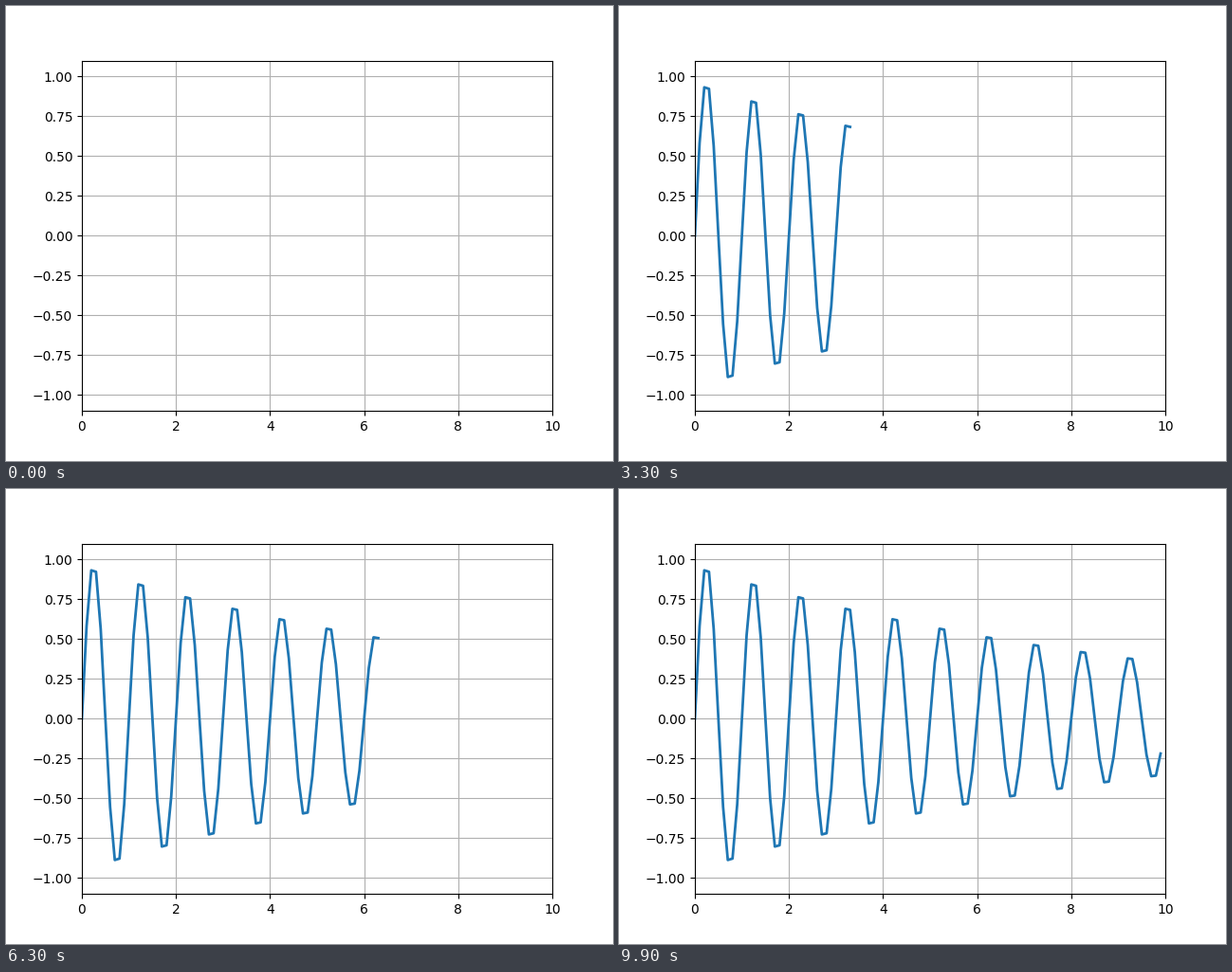
Animation, 640 px wide and 480 px high, one loop 10 s. Source, as a matplotlib script:

```python
import matplotlib.pyplot as plt
import numpy as np
from matplotlib.animation import FuncAnimation

FRAMES = 100
INTERVAL = 100  # ms

t = np.arange(FRAMES) / 10
y = np.sin(2 * np.pi * t) * np.exp(-t / 10)

fig, ax = plt.subplots(figsize=(6.4, 4.8), dpi=100)
line, = ax.plot([], [], lw=2)
ax.set_xlim(0, 10)
ax.set_ylim(-1.1, 1.1)
ax.grid()


def init():
    line.set_data([], [])
    return line,


def update(i):
    line.set_data(t[:i + 1], y[:i + 1])
    return line,


anim = FuncAnimation(fig, update, frames=FRAMES, init_func=init,
                     interval=INTERVAL, repeat=True, repeat_delay=0)
plt.show()
```
